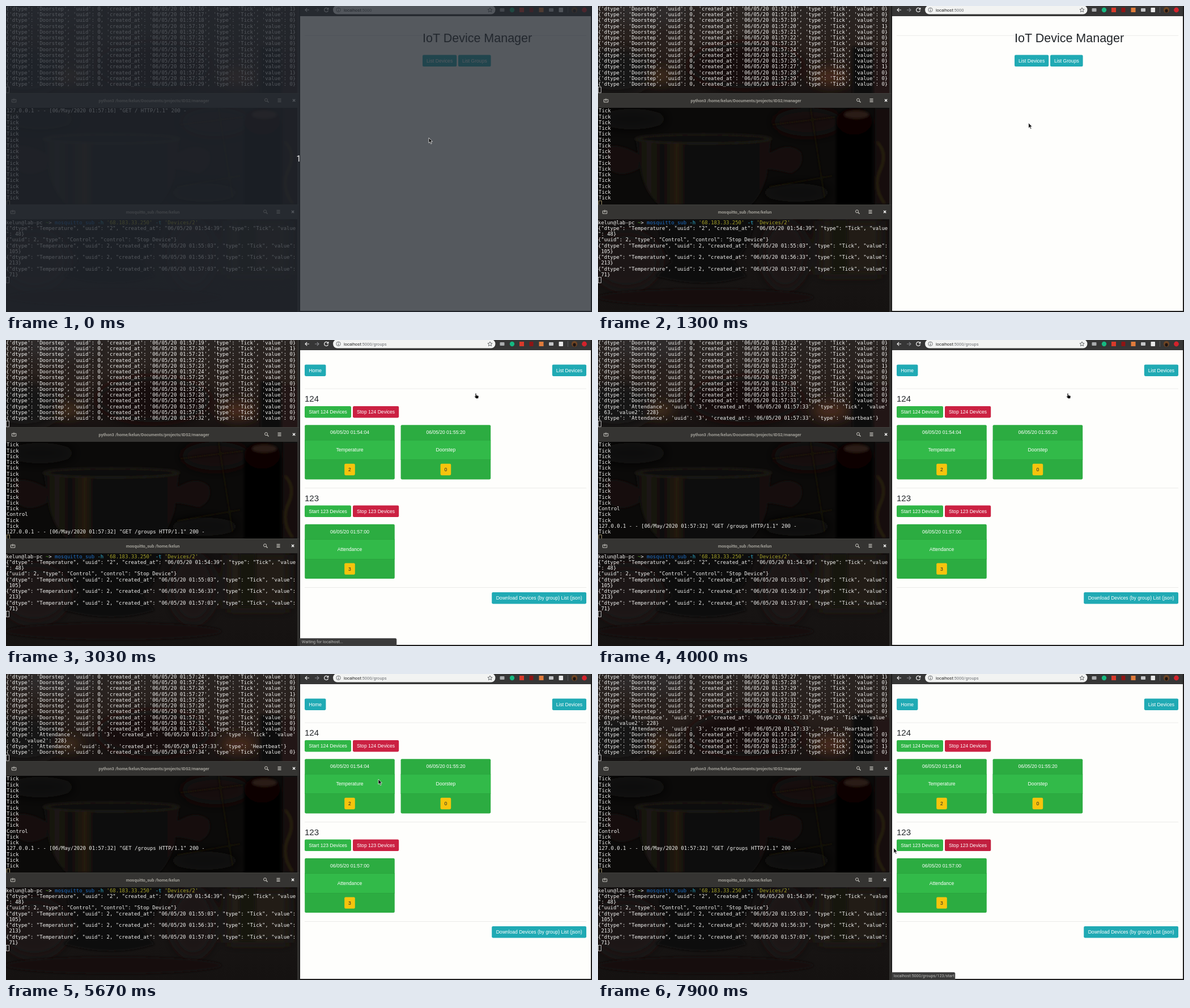
Recreate the animation shown at these times as an HTML page. Size 1034 by 541 pixels, loop 8000 ms.

```html
<!DOCTYPE html>
<html lang="en">
<head>
<meta charset="utf-8">
<title>IoT Device Manager</title>
<style>
html, body { margin: 0; width: 100%; height: 100%; overflow: hidden; background: #111; }
svg { display: block; width: 1034px; height: 541px; }
text { white-space: pre; }
.mono { font: 8.95px "DejaVu Sans Mono", monospace; fill: #f4f4f2; }
.page { font: 8.57px "Liberation Sans", Arial, sans-serif; }
.ui { font: 7.5px Roboto, sans-serif; }
.title { font: 700 7.5px Roboto, sans-serif; fill: #a09e97; text-anchor: middle; }
.mid { text-anchor: middle; }
</style>
</head>
<body>
<svg id="stage" viewBox="0 0 1034 541" xmlns="http://www.w3.org/2000/svg"></svg>
<script>
const LOOP = 8000, ROW = 10.25;
const USER = 'kelun', HOST = 'lab-pc';
const TEAL = '#20aab4', GREEN = '#2fb546', RED = '#cb2142';
const DARK = { [TEAL]: '#14818b', [GREEN]: '#238c37', [RED]: '#a31a36' };
const stage = document.getElementById('stage');
const $ = id => document.getElementById(id);

// ---------- drawing helpers ----------
const rect = (x, y, w, h, fill, more = '') =>
  `<rect x="${x}" y="${y}" width="${w}" height="${h}" fill="${fill}" ${more}/>`;
const text = (x, y, s, cls, more = '') => `<text x="${x}" y="${y}" class="${cls}" ${more}>${s}</text>`;
const line = (d, color, w = 1, more = '') =>
  `<path d="${d}" fill="none" stroke="${color}" stroke-width="${w}" ${more}/>`;
const oval = (x, y, rx, ry, fill, more = '') =>
  `<ellipse cx="${x}" cy="${y}" rx="${rx}" ry="${ry}" fill="${fill}" ${more}/>`;
const rule = y => rect(527, y, 497, .7, '#e3e3e0');

function button(x, y, w, label, color, id) {
  const shape = fill => rect(x, y, w, 20.4, fill, 'rx="2.1"');
  const hover = id ? `<g id="${id}" opacity="0">${shape(DARK[color])}</g>` : '';
  return shape(color) + hover + text(x + w / 2, y + 13.2, label, 'page mid', 'fill="#fff"');
}

function card(x, y, date, name, id) {
  const c = x + 79.3;
  return rect(x, y, 158.6, 96.2, '#2cac41', 'rx="2.1"') +
    rect(x, y + 27, 158.6, 34.5, '#32ba49') +
    rect(x, y + 26.6, 158.6, .6, '#289d3b') + rect(x, y + 61.2, 158.6, .6, '#289d3b') +
    rect(c - 9.3, y + 68.6, 18.6, 20.4, '#f6c40d', 'rx="2.1"') +
    text(c, y + 16.1, date, 'page mid', 'fill="#fff"') +
    text(c, y + 47.1, name, 'page mid', 'fill="#fff"') +
    text(c, y + 81.8, id, 'page mid', 'fill="#212529"');
}

function group(y, name) {
  return text(527, y + 5.2, name, 'page', 'style="font-size:15px" fill="#212529"') +
    button(527, y + 13, 82, `Start ${name} Devices`, GREEN, 'start' + name) +
    button(612, y + 13, 81.2, `Stop ${name} Devices`, RED, 'stop' + name);
}

function titleBar(y, x, title) {
  const c = '#c9c7c1', m = y + 12.8;
  return rect(0, y, 517.5, 26, '#353432') + rect(0, y, 517.5, .7, '#464542') +
    text(x + 247, m + 2.7, title, 'title') +
    line(`M${x - 1.6} ${m - 1.6}h-2v4.8h7.4v-4.8h-2M${x} ${m - 3.4}v4.6m-2-2.3h4`, c, 1) +
    `<circle cx="${x + 445}" cy="${m - .7}" r="2.5" fill="none" stroke="${c}"/>` +
    line(`M${x + 447} ${m + 1.2}l2.5 2.5`, c, 1.3) +
    line(`M${x + 465.5} ${m - 2.4}h6m-6 2.5h6m-6 2.5h6`, c, 1.1) +
    line(`M${x + 492} ${m - 2}l4.2 4.2m0-4.2l-4.2 4.2`, '#fff', 1.3);
}

const rows = (id, n, x, y) => `<g id="${id}">` + Array.from({ length: n },
  (_, i) => text(x, (y + i * ROW).toFixed(2), '', 'mono')).join('') + '</g>';
const caret = (x, y, h, color) => rect(x, y, 5, h, 'none', `stroke="${color}" stroke-width=".8"`);

// ---------- dim wallpaper behind the terminals ----------
const wallpaper = `
<defs>
  <filter id="soft" x="-50%" y="-50%" width="200%" height="200%"><feGaussianBlur stdDeviation="10"/></filter>
  <filter id="hazy"><feGaussianBlur stdDeviation="2"/></filter>
  <linearGradient id="sky" x2="0" y2="1"><stop stop-color="#2a2523"/><stop offset=".5" stop-color="#281f1b"/><stop offset="1" stop-color="#171211"/></linearGradient>
  <linearGradient id="brass"><stop stop-color="#0d0c0a"/><stop offset=".1" stop-color="#1c1813"/><stop offset=".2" stop-color="#0f0d0b"/><stop offset=".31" stop-color="#241b11"/><stop offset=".38" stop-color="#0d0b09"/><stop offset=".8" stop-color="#0b0a08"/><stop offset="1" stop-color="#16110d"/></linearGradient>
  <linearGradient id="floor" x2="0" y2="1"><stop stop-color="#131010"/><stop offset=".6" stop-color="#171413"/><stop offset="1" stop-color="#151211"/></linearGradient>
  <clipPath id="a"><path d="M0 0H514V154H0z"/></clipPath>
  <clipPath id="b"><path d="M0 180H514V351H0z"/></clipPath>
  <clipPath id="c"><path d="M0 377H514V541H0z"/></clipPath>
</defs>
<g clip-path="url(#a)">${rect(0, 0, 514, 154, 'url(#sky)')}
  <g filter="url(#soft)">${oval(30, 115, 70, 40, '#171312')}${oval(260, 105, 100, 40, '#17110f')}
  ${oval(112, 124, 20, 10, '#4a301f')}${oval(410, 125, 32, 16, '#472c1c')}${oval(90, 10, 70, 22, '#2e2929')}</g>
  <g filter="url(#hazy)">${rect(449, 72, 36, 90, '#0a0808')}${rect(487, 80, 30, 80, '#241813')}</g></g>
<g clip-path="url(#b)">${rect(0, 180, 514, 171, '#0b0a09')}
  <g filter="url(#soft)">${oval(370, 205, 60, 25, '#120f0e')}${oval(60, 200, 60, 18, '#100d0c')}${oval(350, 330, 60, 16, '#110e0d')}</g>
  <g filter="url(#hazy)">${line('M306 210L420 196M300 320L415 300M375 180L400 340', '#161311', 2)}
  <path d="M12 250Q35 240 72 262V288Q40 305 22 290z" fill="#15100c"/>
  <path d="M300 262Q335 238 358 258Q366 285 340 296Q318 290 298 288z" fill="#18110d"/>
  <path d="M66 234Q185 220 305 238L298 300Q288 335 270 352H108Q84 330 76 295z" fill="url(#brass)"/>
  ${oval(186, 235, 120, 8, '#090807', 'stroke="#25201c" stroke-width="2"')}
  ${rect(420, 205, 65, 150, '#030303')}${oval(452, 204, 32, 24, '#070505')}${oval(456, 192, 22, 7, '#2a1a15')}
  ${rect(489, 180, 28, 171, '#120e0a')}${line('M492 240Q512 260 498 290T506 350', '#2f2514', 3)}</g></g>
<g clip-path="url(#c)">${rect(0, 377, 514, 164, 'url(#floor)')}
  <g filter="url(#soft)">${oval(50, 450, 60, 50, '#1a1614')}${oval(330, 440, 40, 60, '#1a1513')}${rect(390, 380, 110, 95, '#211b19')}</g>
  <g filter="url(#hazy)"><path d="M104 370H278Q268 430 240 452L262 478Q190 502 102 478L130 452Q108 420 104 370z" fill="#0b0909"/>
  ${rect(412, 377, 28, 94, '#161211')}${oval(190, 515, 190, 15, '#12100f')}</g></g>
${rect(514, 0, 3.5, 541, '#32312f')}`;

// ---------- terminals ----------
const prompt = `${USER}@${HOST} <tspan fill="#4e9a2a">~</tspan>&gt; <tspan fill="#1d6fc6">mosquitto_sub</tspan> ` +
  `<tspan fill="#2fb0d2">-h</tspan> <tspan fill="#a8a52a">'68.183.33.250'</tspan> ` +
  `<tspan fill="#2fb0d2">-t</tspan> <tspan fill="#a8a52a">'Devices/2'</tspan>`;
const reading = (uuid, time) =>
  `{"dtype": "Temperature", "uuid": ${uuid}, "created_at": "06/05/20 ${time}", "type": "Tick", "value`;
const subLog = [prompt, reading('"2"', '01:54:39'), '": 48}',
  '{"uuid": 2, "type": "Control", "control": "Stop Device"}',
  reading(2, '01:55:03') + '":', ' 105}', reading(2, '01:56:33') + '":', ' 213}',
  reading(2, '01:57:03') + '":', ' 71}'];

const terminals = rows('feed', 14, 0, 7.9) + caret(.4, 143.2, 10, '#ddd') +
  titleBar(154, 14, `python3 /home/${USER}/Documents/projects/IDS2/manager`) +
  rows('server', 16, 1, 188.4) + line('M1.4 351V344.4H6.4V351', '#c9b98a', .8) +
  titleBar(351, 12, `mosquitto_sub /home/${USER}`) +
  subLog.map((s, i) => text(0, 385.6 + i * ROW, s, 'mono')).join('') + caret(.4, 479.5, 10, '#ddd');

// ---------- browser ----------
const toolbar = rect(517.5, 0, 516.5, 541, '#1d1c1c') + rect(519, 0, 513, 18, '#363636') +
  line('M535 7h-7m3.2-3.2L528 7l3.2 3.2', '#eee', 1.2) +
  line('M545 7h7m-3.2-3.2L552 7l-3.2 3.2', '#85868a', 1.2) +
  `<g id="reload">${line('M568 5a3.5 3.5 0 1 0 .5 2.8M568.8 3v2.8h-2.8', '#eee', 1.2)}</g>` +
  `<g id="halt">${line('M562.4 4l6 6m0-6l-6 6', '#eee', 1.2)}</g>` +
  rect(577, -1, 286.5, 15.4, '#f2f3f2', 'rx="7.7"') +
  line('M586.5 6.4v3M586.5 4.2v1', '#55585c', 1) +
  '<circle cx="586.5" cy="6.8" r="3.7" fill="none" stroke="#55585c" stroke-width=".8"/>' +
  `<text x="596" y="9.6" class="ui" fill="#222">localhost<tspan id="path" fill="#6d7074"></tspan></text>` +
  line('M854 3l1.2 2.6 2.8.3-2.1 1.9.6 2.8-2.5-1.5-2.5 1.5.6-2.8-2.1-1.9 2.8-.3z', '#55585c', .9) +
  rect(871.5, 4, 8, 6, '#a9abad', 'rx="1"') + oval(893, 7, 4.2, 4.2, '#16b881') +
  rect(906, 3, 8, 8, '#d93a2b') + rect(923.5, 3, 7, 8, '#8e1414', 'rx="1"') +
  rect(940.5, 3, 8, 8, '#e07b3c') + rect(958, 4, 8, 6, '#c3c4c6', 'rx="1"') +
  rect(975.5, 3, 7.5, 8, '#e8e8e8', 'rx="1"') + rect(991, 2, .7, 10, '#6b6c6f') +
  oval(1003, 7, 5.2, 5.2, '#6d4424') + oval(1003, 8.6, 2.6, 3, '#1e1512') + oval(1020.5, 7, 4.4, 4.4, '#d3232c') +
  rect(519, 18, 513, 521, '#fefefc');

const home = `<g id="home">${rule(51.8)}` +
  text(735, 63.9, 'IoT Device Manager', 'page', 'style="font-size:21.5px" fill="#212529"') +
  button(735, 86.6, 60.2, 'List Devices', TEAL) +
  rect(797.2, 85.8, 59.2, 22, 'none', 'id="ring" rx="3" stroke="#8fd0d8" stroke-width="1.7"') +
  button(798, 86.6, 57.6, 'List Groups', TEAL, 'groupsBtn') + '</g>';

const groups = '<g id="groups">' + button(527, 43.5, 37.4, 'Home', TEAL) +
  button(963.8, 43.5, 60.2, 'List Devices', TEAL) + rule(85.7) +
  group(104, '124') + card(527.2, 150.2, '06/05/20 01:54:04', 'Temperature', 2) +
  card(696.6, 150.2, '06/05/20 01:55:20', 'Doorstep', 0) + rule(261.5) +
  group(279.6, '123') + card(527.2, 325.8, '06/05/20 01:57:00', 'Attendance', 3) + rule(437) +
  button(857.2, 446, 166.8, 'Download Devices (by group) List (json)', TEAL) + '</g>';

const bubble = '<g id="bubble"><path id="bubbleBox" fill="#3a3a3a" stroke="#5a5a5a" stroke-width=".6"/>' +
  text(521.8, 536, '', 'ui', 'id="bubbleText" style="font-size:7.3px" fill="#bdbdbb"') + '</g>';

const pointer = '<g id="cursor" fill="#111" stroke="#fff" stroke-width=".7">' +
  '<path id="arrow" d="M0 0V9.2L2 7.3 3.7 10.8 5.2 10.1 3.6 6.7H6.5z"/>' +
  '<path id="hand" d="M1 0Q2 0 2 1V3.6L5.4 4.4Q6.4 5 6 7L5.3 9.6H1.4L-1.6 6Q-1.4 4.8 0 5.8V1Q0 0 1 0z"/></g>';

const veil = `<g id="veil">${rect(0, 0, 1034, 541, '#22282f', 'opacity=".77"')}` +
  text(516.5, 274.5, '1', 'mid', 'style="font:14px Roboto,sans-serif" fill="#fff"') + '</g>';

stage.innerHTML = wallpaper + terminals + toolbar + home + groups + bubble + veil + pointer;

// ---------- timeline ----------
const feedTimes = [700, 1730, 2730, 3830, 4970, 5930, 6930, 7800];
const feedLog = [];
for (let s = 16; s <= 37; s++) {
  const value = [16, 20, 27, 36].includes(s) ? 1 : 0;
  feedLog.push([feedTimes[s - 30] || 0,
    `{'dtype': 'Doorstep', 'uuid': 0, 'created_at': '06/05/20 01:57:${s}', 'type': 'Tick', 'value': ${value}}`]);
  if (s === 33) {
    const head = "{'dtype': 'Attendance', 'uuid': '3', 'created_at': '06/05/20 01:57:33', 'type': ";
    for (const part of [head + "'Tick', 'value'", ": 63, 'value2': 228}", head + "'Heartbeat'}"]) feedLog.push([4000, part]);
  }
}

const request = (time, path) => `127.0.0.1 - - [06/May/2020 ${time}] "GET ${path} HTTP/1.1" 200 -`;
const serverLog = [[0, request('01:57:16', '/')], ...Array(15).fill([0, 'Tick']),
  [800, 'Tick'], [1400, 'Control'], [1770, 'Tick'], [2470, 'Tick'],
  [2730, request('01:57:32', '/groups')], [3400, 'Tick'], [4500, 'Tick'], [5000, 'Tick']];

const path = [[0, 746, 233], [700, 746, 233], [800, 745, 231], [1100, 745, 231], [1850, 828, 94],
  [5270, 828, 94], [5670, 657, 186], [5930, 657, 186], [6400, 650, 124], [6600, 650, 124],
  [7000, 648, 300], [7730, 648, 300], [7900, 521.8, 307.5]];

const hovers = [['groupsBtn', 1690, 3030], ['stop124', 6270, 6666], ['stop123', 6950, 7788], ['start123', 7795, 7845]];

// start, text, right edge
const hints = [[0, '', 0], [1860, 'localhost:5000/groups', 598.5], [2430, 'Waiting for localhost...', 689],
  [3470, '', 0], [6600, 'localhost:5000/groups/124/stop', 630], [6980, 'localhost:5000/groups/123/stop', 630],
  [7830, 'localhost:5000/groups/123/start', 630]];

const clamp = v => Math.max(0, Math.min(1, v));
const show = (id, on) => $(id).setAttribute('display', on ? 'inline' : 'none');
const setText = (el, s) => { if (el.textContent !== s) el.textContent = s; };

function fill(id, log, t) {
  const slots = $(id).children;
  const seen = log.filter(e => e[0] <= t).slice(-slots.length);
  seen.forEach((e, i) => setText(slots[i], e[1]));
}

function place(t) {
  const i = path.findIndex(k => k[0] > t);
  if (i < 0) return path[path.length - 1].slice(1);
  const [t0, x0, y0] = path[i - 1], [t1, x1, y1] = path[i];
  const u = (t - t0) / (t1 - t0), e = u * u * (3 - 2 * u);
  return [x0 + (x1 - x0) * e, y0 + (y1 - y0) * e];
}

function draw(t) {
  show('veil', t < 30);
  fill('feed', feedLog, t);
  fill('server', serverLog, t);

  const loaded = t >= 3030, loading = t >= 2200 && !loaded;
  show('home', !loaded);
  show('groups', loaded);
  show('reload', !loading);
  show('halt', loading);
  setText($('path'), t < 2730 ? ':5000' : ':5000/groups');

  let hand = t >= 1690 && t < 5290;
  for (const [id, from, to] of hovers) {
    const level = Math.min(t - from, to - from, 150) / 150 - Math.max(0, t - to) / 150;
    $(id).setAttribute('opacity', clamp(level));
    hand = hand || (t >= from && t < to);
  }
  $('ring').setAttribute('opacity', clamp((t - 1960) / 80));

  const hint = hints.filter(h => h[0] <= t).pop();
  show('bubble', hint[1] !== '');
  setText($('bubbleText'), hint[1]);
  $('bubbleBox').setAttribute('d', `M518.5 541V527.6H${hint[2] - 2}q2 0 2 2V541z`);
  $('bubble').setAttribute('opacity', t >= 3300 && t < 3470 ? 1 - (t - 3300) / 170 : 1);

  const [x, y] = place(t);
  $('cursor').setAttribute('transform', `translate(${x.toFixed(2)} ${y.toFixed(2)})`);
  show('arrow', !hand);
  show('hand', hand);
}

const begin = performance.now();
function tick() {
  draw((performance.now() - begin) % LOOP);
  requestAnimationFrame(tick);
}
tick();
</script>
</body>
</html>
```
